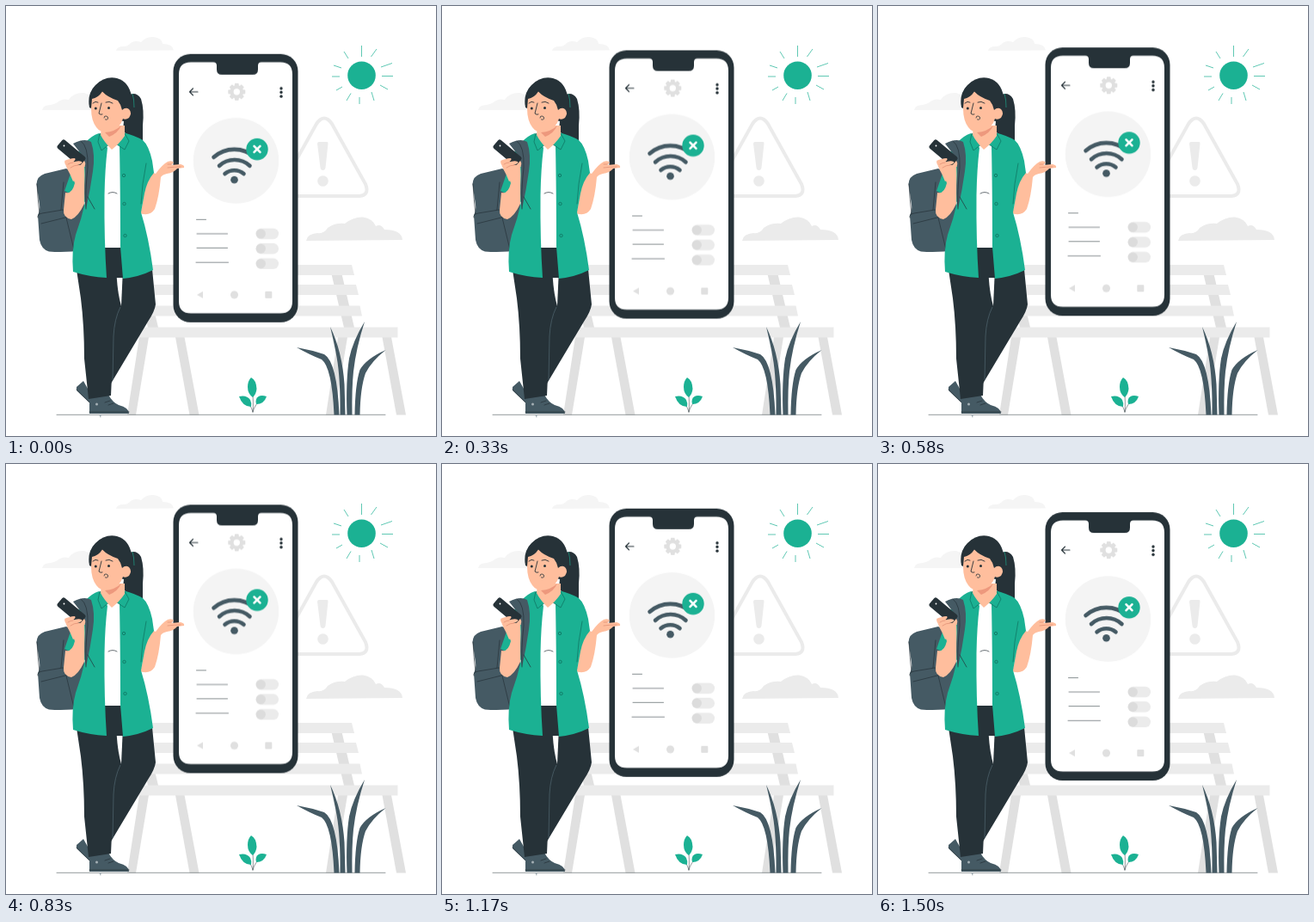
An HTML page for the animation above (1540 ms loop, 500 by 500 pixels).

```html
<!DOCTYPE html>
<html lang="en">
<head>
<meta charset="utf-8">
<title>No connection</title>
<style>
  html, body { margin: 0; width: 100%; height: 100%; overflow: hidden; background: #fff; }
  svg { display: block; width: 100%; height: 100%; }
  .green { fill: #1bb193; }
  .dark { fill: #263238; }
  .slate { fill: #455a64; }
  .skin { fill: #ffbe9d; }
  .pale { fill: #ebebeb; }
  .mid { fill: #e0e0e0; }
  .line, .seam, .fold, .crease, .wifi { fill: none; stroke-linecap: round; stroke-linejoin: round; }
  .line { stroke: #263238; }
  .seam { stroke: #0f6f5d; }
  .fold { stroke: #263238; }
  .crease { stroke: #dd8b72; }
  .wifi { stroke: #455a64; }
  .float { animation: float 1540ms linear -30ms infinite; }
  @keyframes float {
    0%, 100% { transform: translateY(.2px); }
    50% { transform: translateY(-9.8px); }
  }
</style>
</head>
<body>
<svg viewBox="0 0 500 500">
  <defs>
    <rect id="tooth" x="-2.4" y="-10" width="4.8" height="6" rx="1"/>
    <g id="toggle">
      <rect x="290.500" y="-6.200" width="26.500" height="12.400" rx="6.200" fill="#ebebeb"/>
      <circle cx="296.300" r="5.600" fill="#dcdcdc"/>
    </g>
    <path id="legA" d="M155 385H166L151 475.500H141Z"/>
    <path id="legB" d="M197 385H207.500L224.500 475.500H213.500Z"/>
    <path id="post" d="M376 301H388L405 374H393Z"/>
  </defs>

  <!-- Sky -->
  <path fill="#f5f5f5" d="M128 52Q129 47 137 47Q141 47 143 45Q148 39 157 42Q163 35 172 36Q181 37 182 44Q194 44 195 51.500Z"/>
  <path fill="#f5f5f5" d="M42 121Q43 115 52 115Q57 114 60 112Q65 107 73 109Q79 100 91 101L112 110V121Z"/>
  <path class="pale" d="M349 273Q350 265 362 264Q370 265 374 258Q382 252 394 253Q404 245 415 245.500Q426 247 430 256Q436 253 440 260Q460 260 461 272Z"/>
  <circle class="green" cx="413.500" cy="80.700" r="16.300"/>
  <path d="M413.500 46V59M431 50L424.500 59M449 66.500L436 71M450 81.500H437M444 97L435 92M428 110L425 100M411 114V106M396 110L401 101.500M384 98L391 94M379 82H388M381 69L390 72M393 53L398 61" fill="none" stroke="#1bb193" stroke-width=".7"/>

  <!-- Warning sign -->
  <path d="M361 137Q370 124 379 137L418 207Q423 220 411 221H329Q317 220 322 207Z" fill="none" stroke="#ebebeb" stroke-width="4"/>
  <path class="pale" d="M364 158H373Q375 158 374.500 160L371.500 188Q371 191 368.500 191Q366 191 365.500 188L362 160Q362 158 364 158Z"/>
  <circle class="pale" cx="368.500" cy="203.500" r="6.300"/>

  <!-- Bench -->
  <g class="mid">
    <use href="#post"/><use href="#post" x="-228"/>
    <use href="#legA"/><use href="#legA" x="231"/>
    <use href="#legB"/><use href="#legB" x="240.500"/>
  </g>
  <g class="pale">
    <path d="M140 301H402L405 313H140Z"/>
    <path d="M140 324H407L410 336H140Z"/>
    <path d="M140 348.500H411.500L414 360.500H140Z"/>
    <path d="M140 373.500H455.500V385.500H140Z"/>
  </g>

  <path class="line" d="M59 475.300H441" stroke-width=".5"/>

  <!-- Plants -->
  <g class="slate">
    <path d="M338 397Q355 400 370 405Q385 414 387.500 475.500H381.500Q379 420 367 411Q354 406 338 397Z"/>
    <path d="M377 373Q391 402 393.500 440L394.500 475.500H388.500Q389 433 384.500 408Q382 394 377 373Z"/>
    <path d="M417 367Q407 398 404 425Q402 444 402.500 475.500H396.500Q395 436 399 410Q403 390 417 367Z"/>
    <path d="M441.500 400Q425 413 418 427Q412 444 411.500 475.500H405.500Q406 440 411.500 423Q419 410 441.500 400Z"/>
  </g>
  <path class="line" stroke-width=".5" d="M287 472Q288 462 286.500 446M287 472Q285 463 276 457M287 472Q289 463 298 457"/>
  <g class="green">
    <path d="M285 432Q291 435 291.500 445Q291 451 287 455Q281 451 281 443Q281 436 285 432Z"/>
    <path d="M271 454Q280 452 284 458Q286 462 285 466Q275 466 271 454Z"/>
    <path d="M303 454Q294 451 291 457Q290 460 291 463Q300 463 303 454Z"/>
  </g>

  <!-- Device -->
  <g class="float">
    <rect class="dark" x="194.500" y="56" width="145" height="312" rx="20"/>
    <path fill="#fff" d="M215 65.500H241Q245 65.500 245 69.500V74Q245 80 251 80H287Q293 80 293 74V69.500Q293 65.500 297 65.500H319Q333 65.500 333 79.500V343.500Q333 357.500 319 357.500H215Q201 357.500 201 343.500V79.500Q201 65.500 215 65.500Z"/>
    <path class="line" stroke-width="1.100" d="M223 100H213.500M217.500 96L213.500 100L217.500 104"/>
    <g id="gear" class="mid" transform="translate(268.300 100)">
      <circle r="7.800"/>
      <circle r="3.700" fill="#fff"/>
    </g>
    <g class="dark">
      <circle cx="320" cy="96" r="1.700"/><circle cx="320" cy="100.500" r="1.700"/><circle cx="320" cy="105.200" r="1.700"/>
    </g>
    <circle cx="267.500" cy="180" r="49.700" fill="#f4f4f4"/>
    <path class="wifi" stroke-width="4.600" d="M241.500 176A36 36 0 0 1 289.500 176M248 186A26 26 0 0 1 283.500 186M254.500 195.300A17 17 0 0 1 276.500 195.300"/>
    <circle class="slate" cx="265.500" cy="202.200" r="4.300"/>
    <circle class="green" cx="292" cy="166.700" r="12.700"/>
    <path d="M288.500 163.200L295.500 170.200M295.500 163.200L288.500 170.200" stroke="#fff" stroke-width="2.600" stroke-linecap="round"/>
    <path class="line" stroke-width=".55" d="M221.500 248.500H232.500M222 265H257.500M222 281.500H257.500M221 298.300H258.500"/>
    <use href="#toggle" y="265"/><use href="#toggle" y="282.300"/><use href="#toggle" y="299.800"/>
    <g class="mid">
      <path d="M222 336L229 332V340Z"/>
      <circle cx="265.500" cy="336" r="4.500"/>
      <rect x="301.300" y="332" width="8" height="8" rx="1"/>
    </g>
  </g>

  <!-- Backpack -->
  <path class="slate" d="M35.500 207Q36 198 45 195L70 189L92 200L90 284Q70 287 50 285.500Q41 283 39 272L37 243Q40 238 39 231Z"/>
  <path class="fold" stroke-width=".7" d="M39 242Q37 225 36 207M67 205L64 237M37 246Q36 242 42 241L66 237Q69 237 69 242L79 283M41 253L69 246"/>

  <!-- Shoes and trousers -->
  <path class="slate" d="M82 443L90 436L99 452V463Q88 453 82 447Z"/>
  <path class="fold" stroke-width=".7" d="M82 446L98 462"/>
  <path class="slate" d="M97 455L119 452Q124 461 131 464Q143 467 143 474H97Z"/>
  <path class="fold" stroke-width=".7" d="M97 472H143M115 461L121 459M119 464L125 462"/>
  <circle cx="105.500" cy="463" r="1.500" fill="#a5b0b5"/>
  <path d="M108 475L110 479L111 475Z" fill="#a5b0b5"/>
  <path class="dark" d="M133 290L170 306L174 347Q173 355 165 367L122 439L100 450L120 350Z"/>
  <path class="dark" d="M81 300L114 277H134V318L133 348Q126 363 125 385L122 453L96 457L91 410Q91 372 87 340Z"/>
  <path fill="#fff" d="M128.800 316H135.500L134 349Q130 335 128.800 316Z"/>
  <path d="M133 350Q126 364 125 384L124 435" fill="none" stroke="#526771" stroke-width=".7"/>

  <!-- Ponytail -->
  <path class="dark" d="M139 105Q151 98 157 108Q161 121 159 139L159 159Q149 160 142 151L136 145Q138 125 139 105Z"/>
  <path d="M147 102Q149 108 149 118" fill="none" stroke="#1bb193" stroke-width=".6"/>

  <!-- Shirt and arms -->
  <path fill="#fff" d="M110 160L123 167L137 158L135 281H114Z"/>
  <path class="skin" d="M158 234L163 197Q169 192 174 195Q182 184 188 181Q193 179 195 182L192 185L203 184Q208 185 207 188L199 189Q195 194 187 195Q182 196 180 199Q178 222 173 236Q167 245 156 241Z"/>
  <path class="crease" stroke-width=".7" d="M188 188Q195 187 203 187M188 184L193 184"/>
  <path class="green" d="M108 148L118 165Q115 190 114.500 220Q114 272 117 316Q97 315 78 309Q76 284 81 266Q88 247 92 228L76 219L68 215L75 195Q82 168 92 159Q99 151 108 148Z"/>
  <path class="skin" d="M74 188L91 184Q92 205 91 230Q84 245 76 248Q66 246 67 237L69 217Q77 219 80 206Z"/>
  <path class="green" d="M136 147Q151 151 159 156Q166 162 170 180L172 194Q164 203 161 218L157 240Q166 269 171 307Q155 315 136 317L133 280Q133 213 132 163Z"/>
  <path class="seam" stroke-width=".7" d="M163 183L159 207L157 230"/>
  <path class="green" stroke="#0f6f5d" stroke-width=".7" stroke-linejoin="round" d="M109 148L120 161L111 168L107 158ZM138 148L143 157L138 167L129 161Z"/>
  <g fill="none" stroke="#0f6f5d" stroke-width=".8">
    <circle cx="137" cy="197" r="1.700"/><circle cx="137.500" cy="230" r="1.700"/><circle cx="138.500" cy="267" r="1.700"/>
  </g>
  <path class="line" stroke-width=".7" d="M119 218Q124 215 129 218"/>

  <!-- Strap -->
  <path class="slate" d="M78 160Q91 153 99 158Q104 173 101 192Q98 214 93 236Q90 220 92 197Q93 177 85 169Z"/>
  <path class="fold" stroke-width=".7" d="M87 157Q96 163 95 188Q92 215 93 236M95 222L103 236"/>

  <!-- Hand and handset -->
  <path class="skin" d="M68 180Q75 176 80 181L91 180Q94 184 90 188L86 198L78 204Q75 196 71 189Z"/>
  <rect x="-17.500" y="-6.500" width="35" height="13" rx="2.500" class="dark" transform="translate(76 170.500) rotate(40)"/>
  <circle cx="67.500" cy="162.500" r=".9" fill="#fff"/>
  <path class="skin" d="M68 182Q73 177 80 177Q82 179 77 182Q84 179 88 181Q90 183 83 185Q90 184 92 186Q90 190 83 191L73 192Z"/>
  <path class="crease" stroke-width=".7" d="M72 184Q75 182 78 182M75 188Q79 185 84 185"/>

  <!-- Head -->
  <path class="skin" d="M111 139H138V151Q132 160 123 167Q114 158 110 150Z"/>
  <path class="dark" d="M97 118Q94 102 104 92Q115 81 129 84Q143 88 146 105Q147 121 141 135L120 130Z"/>
  <path class="skin" d="M100 108Q107 107 112 99.500Q118 106 130 110Q134 115 135 121Q139 117 143 120Q147 124 143 130Q139 133 136 131Q133 142 121 146Q111 149 105 141Q99 133 99 119Z"/>
  <path d="M115 147Q127 146 134 139Q130 148 120 152Z" fill="#ed987d"/>
  <path class="line" stroke-width=".9" d="M101 113Q104 110 107 112M116 112Q120 110 124 113M111 113L108 125Q110 127 112 126"/>
  <g class="dark"><circle cx="104.300" cy="119" r="1.500"/><circle cx="119.500" cy="118.500" r="1.500"/></g>
  <path class="line" stroke-width=".8" d="M114 130Q114 127.500 116.500 128Q119 128.500 118.500 131Q118 133 115.500 132"/>
</svg>
<script>
  const gear = document.getElementById("gear");
  for (let angle = 0; angle < 360; angle += 45) {
    const tooth = document.createElementNS("http://www.w3.org/2000/svg", "use");
    tooth.setAttribute("href", "#tooth");
    tooth.setAttribute("transform", `rotate(${angle})`);
    gear.prepend(tooth);
  }
</script>
</body>
</html>
```
